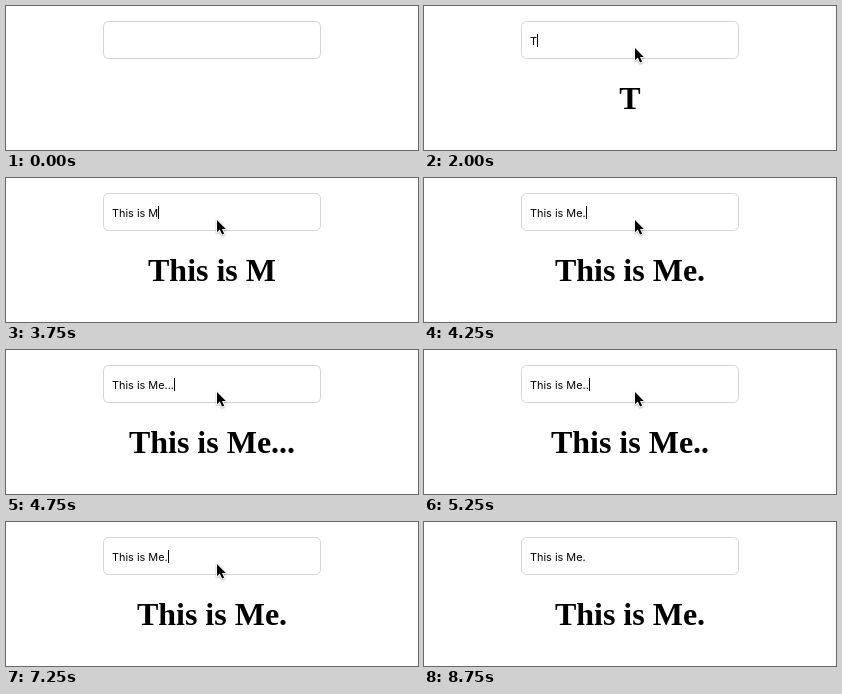
These frames come from a looping animation (412x144 px, 9.5 s). An HTML page with a canvas:

```html
<!DOCTYPE html>
<html lang="en">
<head>
<meta charset="utf-8">
<title>Live heading</title>
<style>
html, body { margin: 0; width: 100%; height: 100%; overflow: hidden; background: #fff; }
canvas { display: block; width: 412px; height: 144px; }
</style>
</head>
<body>
<canvas id="stage"></canvas>
<script>
const W = 412, H = 144, LOOP = 9500, TICK = 250;
const canvas = document.getElementById('stage');
const ctx = canvas.getContext('2d');
const ratio = window.devicePixelRatio || 1;
canvas.width = W * ratio;
canvas.height = H * ratio;

const PHRASE = 'This is Me...';
// [time, number of typed characters]
const typing = [
  [0, 0], [2000, 1], [2500, 2], [2750, 4], [3250, 6], [3500, 7],
  [3750, 9], [4000, 10], [4250, 11], [4500, 12], [4750, 13],
  [5250, 12], [5500, 11], [5750, 10], [7250, 11]
];
// [time, pointer x, pointer y]; a missing x hides the pointer
const pointer = [
  [0], [250, 307, 41], [500, 262, 41], [750, 220, 41], [1000, 210, 41],
  [7500, 182, 41], [7750, 146, 41], [8000, 110, 41], [8250]
];

const latest = (steps, t) => steps.filter(s => s[0] <= t).pop();

function drawField(text, caretOn) {
  ctx.strokeStyle = '#d5d5d5';
  ctx.lineWidth = 1;
  ctx.beginPath();
  ctx.roundRect(97.5, 15.5, 217, 37, 5);
  ctx.stroke();

  ctx.font = '10.9px Inter, sans-serif';
  ctx.textAlign = 'left';
  ctx.fillStyle = '#000';
  ctx.fillText(text, 106, 39);
  if (caretOn) {
    ctx.fillRect(Math.round(106 + ctx.measureText(text).width), 28, 1, 13);
  }
}

function drawHeading(text) {
  ctx.font = 'bold 32px "Liberation Serif", serif';
  ctx.textAlign = 'center';
  ctx.fillStyle = '#000';
  ctx.fillText(text.trim(), 206, 103);
}

function drawPointer(x, y) {
  const arrow = new Path2D('M1 1V13.2L3.8 10.6L6 15.6L8.2 14.7L6 9.9H9.8Z');
  ctx.save();
  ctx.translate(x, y);
  ctx.lineWidth = 1.8;
  ctx.lineJoin = 'round';
  ctx.strokeStyle = '#fff';
  ctx.shadowColor = 'rgba(0,0,0,.3)';
  ctx.shadowBlur = 2 * ratio;
  ctx.shadowOffsetY = ratio;
  ctx.stroke(arrow);
  ctx.shadowColor = 'transparent';
  ctx.fillStyle = '#000';
  ctx.fill(arrow);
  ctx.restore();
}

function render(now) {
  const t = Math.floor((now % LOOP) / TICK) * TICK;
  const [typedAt, count] = latest(typing, t);
  const text = PHRASE.slice(0, count);
  // The blink restarts with focus and with every key press
  const since = t - Math.max(1000, typedAt);
  const caretOn = since >= 0 && since % 1000 < 500 && t < 8750;
  const [, x, y] = latest(pointer, t);

  ctx.setTransform(ratio, 0, 0, ratio, 0, 0);
  ctx.fillStyle = '#fff';
  ctx.fillRect(0, 0, W, H);
  drawField(text, caretOn);
  drawHeading(text);
  if (x !== undefined) drawPointer(x, y);
}

const start = performance.now();
function loop() {
  render(performance.now() - start);
  requestAnimationFrame(loop);
}
loop();
</script>
</body>
</html>
```
